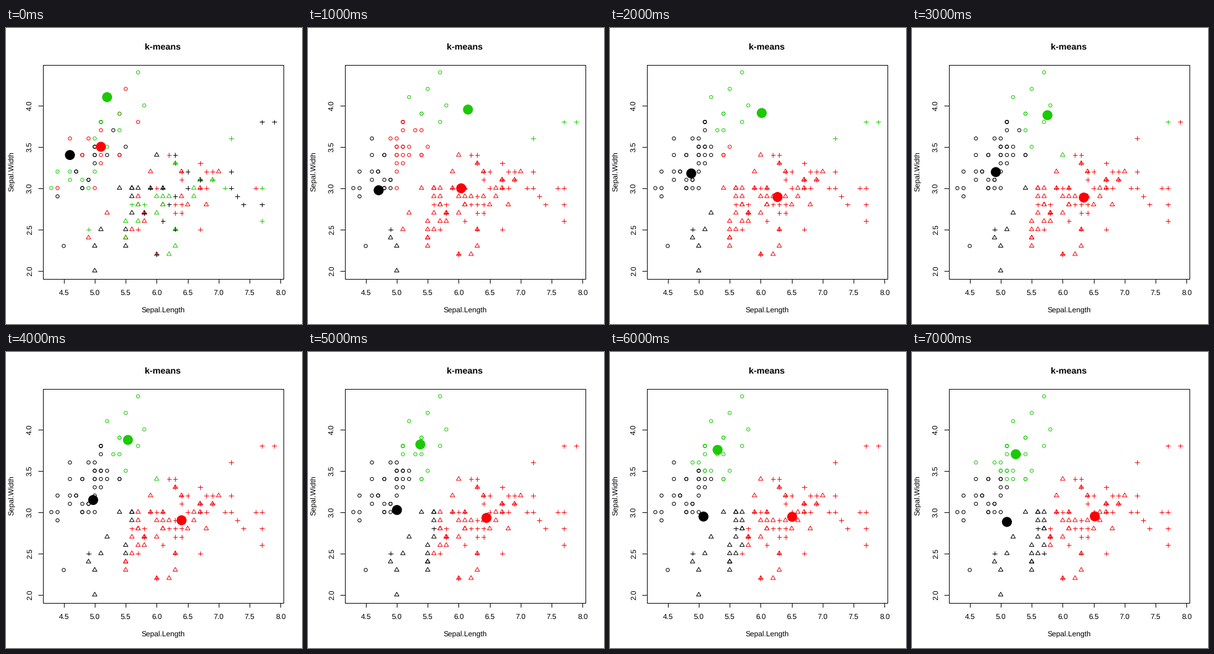
A matplotlib script for the animation above (8000 ms loop, 480 by 480 pixels).

```python
import numpy as np
import matplotlib as mpl
import matplotlib.pyplot as plt
from matplotlib.animation import FuncAnimation
from matplotlib.collections import PathCollection
from matplotlib.path import Path

mpl.rcParams["font.family"] = "Liberation Sans"
mpl.rcParams["text.hinting"] = "none"

SIZE, DPI = 480, 72
LEFT, RIGHT, TOP, BOTTOM = 59.04, 449.76, 59.04, 406.56
X_MIN, X_MAX, Y_MIN, Y_MAX = 4.156, 8.044, 1.904, 4.496
COLORS = np.array(["#000000", "#fb0007", "#1bc905"])
R = 2.7          # radius of a small symbol
R_CENTER = 8.1   # radius of a cluster centre
STEPS = 8

# Iris sepals in mm: width -> lengths starting in the black, red, green cluster
SETOSA = {
    44: ([], [], [57]),
    42: ([], [55], []),
    41: ([], [], [52]),
    40: ([], [], [58]),
    39: ([], [54], [54]),
    38: ([51], [57], [51, 51]),
    37: ([53], [51], [54]),
    36: ([], [46, 49], [50]),
    35: ([50, 50, 55], [51, 51], [52]),
    34: ([46, 48, 50, 50, 52, 54], [48, 51, 54], []),
    33: ([50], [51], []),
    32: ([47, 47], [], [44, 46, 50]),
    31: ([49, 49], [], [46, 48]),
    30: ([48, 48], [44, 50], [43, 49]),
    29: ([44], [], []),
    23: ([45], [], []),
}
VERSICOLOR = {
    34: ([60], [], []),
    33: ([], [], [63]),
    32: ([], [59, 64, 70], []),
    31: ([67], [], [67, 69]),
    30: ([54, 56, 56, 57, 59, 61], [67], [66]),
    29: ([56], [57, 64], [60, 61, 62, 66]),
    28: ([], [57, 61, 65, 68], [57, 61]),
    27: ([56, 58], [52, 58], [60]),
    26: ([], [58], [55, 57]),
    25: ([51, 55], [56], [63]),
    24: ([], [49, 55], [55]),
    23: ([50, 55], [], [63]),
    22: ([], [60], [62]),
    20: ([50], [], []),
}
VIRGINICA = {
    38: ([77, 79], [], []),
    36: ([], [], [72]),
    34: ([63], [62], []),
    33: ([67], [63, 67], []),
    32: ([65, 72], [64, 68, 69], []),
    31: ([67], [64, 69], [69]),
    30: ([59, 61, 65, 65, 65, 72], [60, 67, 68, 76], [71, 77]),
    29: ([63, 73], [], []),
    28: ([62, 64, 74, 77], [63, 64], [56, 58]),
    27: ([58, 58], [63, 64], []),
    26: ([61], [], [77]),
    25: ([63], [57, 67], [49]),
    22: ([60], [], []),
}


def px(x):
    return LEFT + (x - X_MIN) / (X_MAX - X_MIN) * (RIGHT - LEFT)


def py(y):
    return BOTTOM - (y - Y_MIN) / (Y_MAX - Y_MIN) * (BOTTOM - TOP)


def circle(radius):
    unit = Path.unit_circle()
    return Path(unit.vertices * radius, unit.codes)


def triangle():
    w, up, down = 1.3468 * R, 1.5551 * R, 0.7776 * R
    return Path([(0, -up), (w, down), (-w, down), (0, -up)], closed=True)


def plus():
    a = 2 ** 0.5 * R
    return Path([(-a, 0), (a, 0), (0, -a), (0, a)],
                [Path.MOVETO, Path.LINETO] * 2)


def place(shape, x, y):
    return Path(shape.vertices + (px(x), py(y)), shape.codes)


def load():
    points, labels, paths = [], [], []
    species = ((SETOSA, circle(R)), (VERSICOLOR, triangle()), (VIRGINICA, plus()))
    for rows, shape in species:
        for width, groups in rows.items():
            for k, lengths in enumerate(groups):
                for length in lengths:
                    point = length / 10, width / 10
                    points.append(point)
                    labels.append(k)
                    paths.append(place(shape, *point))
    return np.array(points), np.array(labels), paths


def k_means(points, labels, centers):
    """Return the (labels, centers) pair of every step."""
    history = [(labels, centers)]
    while len(history) < STEPS:
        gaps = points[:, None] - centers[None]
        labels = (gaps ** 2).sum(axis=2).argmin(axis=1)
        centers = np.array([points[labels == k].mean(axis=0) for k in range(3)])
        history.append((labels, centers))
    return history


def line(xs, ys):
    ax.plot(xs, ys, color="black", lw=1, solid_capstyle="butt")


def label(x, y, text, size=12, **style):
    ax.text(x, y, text, fontsize=size, ha="center", va="baseline",
            rotation_mode="anchor", **style)


def draw_axes():
    l, r, t, b = 59.5, 449.5, 59.5, 406.5
    ax.plot([l, r, r, l, l], [t, t, b, b, t], color="black", lw=1,
            solid_joinstyle="miter")
    for x in np.arange(4.5, 8.1, 0.5):
        line([px(x)] * 2, [b, b + 7.2])
        label(px(x), 432.7, f"{x:.1f}")
    for y in np.arange(2.0, 4.1, 0.5):
        line([l, l - 7.2], [py(y)] * 2)
        label(41.8, py(y), f"{y:.1f}", rotation=90)
    mid_x, mid_y = (LEFT + RIGHT) / 2, (TOP + BOTTOM) / 2
    label(mid_x, 34.8, "k-means", 14.4, weight="bold")
    label(mid_x, 461.5, "Sepal.Length")
    label(13, mid_y, "Sepal.Width", rotation=90)


fig = plt.figure(figsize=(SIZE / DPI, SIZE / DPI), dpi=DPI, facecolor="white")
ax = fig.add_axes([0, 0, 1, 1])
ax.set_xlim(0, SIZE)
ax.set_ylim(SIZE, 0)
ax.axis("off")
ax.set_autoscale_on(False)
draw_axes()

points, start, paths = load()
history = k_means(points, start, np.array([(4.6, 3.4), (5.1, 3.5), (5.2, 4.1)]))

symbols = PathCollection(paths, facecolors="none", linewidths=1,
                         transform=ax.transData, zorder=3)
dots = PathCollection([], facecolors=COLORS, edgecolors="none",
                      transform=ax.transData, zorder=4)
ax.add_collection(symbols, autolim=False)
ax.add_collection(dots, autolim=False)


def update(step):
    labels, centers = history[step]
    symbols.set_edgecolor(COLORS[labels])
    dots.set_paths([place(circle(R_CENTER), *c) for c in centers])
    return symbols, dots


anim = FuncAnimation(fig, update, frames=STEPS, interval=1000, repeat=True,
                     repeat_delay=0)
plt.show()
```
